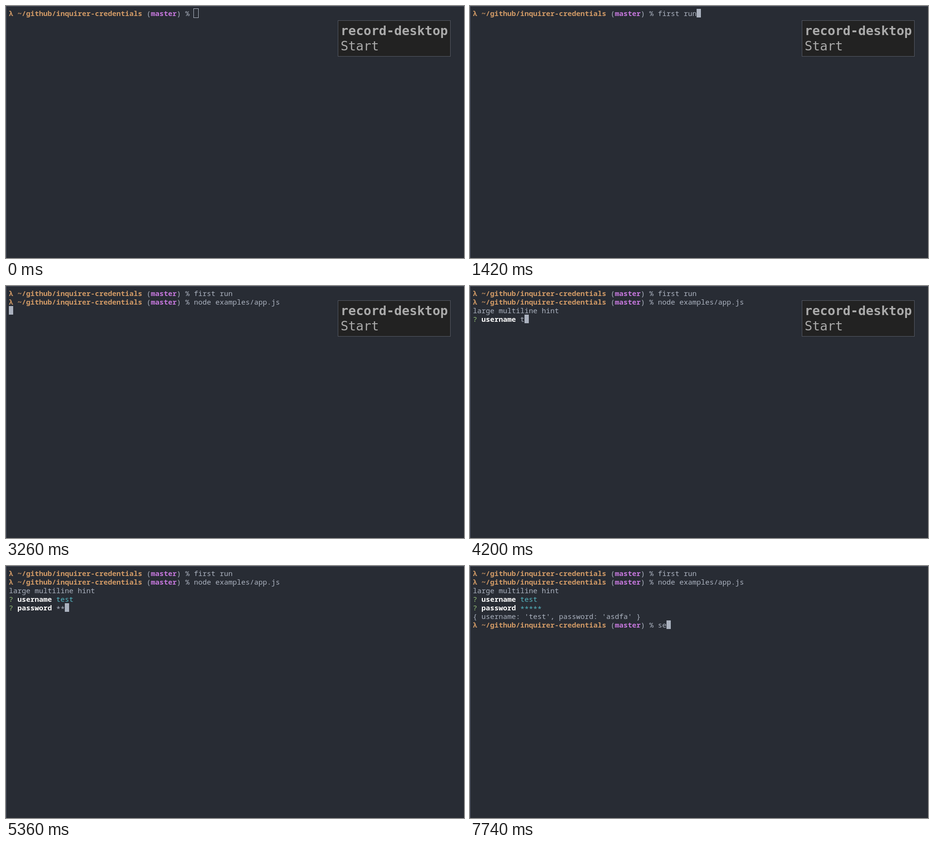
Write an HTML page with a canvas that moves like this. It is 958 by 528 pixels and loops after 8 s.

```html
<!DOCTYPE html>
<html lang="en">
<head>
<meta charset="utf-8">
<title>Terminal session</title>
<style>
  html, body { margin: 0; width: 100%; height: 100%; overflow: hidden; background: #282c34; }
  canvas { display: block; }
</style>
</head>
<body>
<canvas id="stage" width="958" height="528"></canvas>
<script>
const ctx = document.getElementById('stage').getContext('2d');
const LOOP = 8000, CELL = 9, ROW = 18, PAD = 6, INPUT = 43, ANSWER = 11;
const GREY = '#abb2bf', ORANGE = '#d19a66', PURPLE = '#c678dd',
      CYAN = '#56b6c2', GREEN = '#98c379', EDGE = '#4b5263';

// Spans of time in which the blinking cursor is off
const HIDDEN = [[3080, 3260], [3820, 4200], [5260, 5310], [6510, 7110]];

function put(col, row, text, color = GREY, bold = false) {
  ctx.font = `${bold ? 'bold ' : ''}15px "Noto Sans Mono", monospace`;
  ctx.fillStyle = color;
  ctx.fillText(text, PAD + col * CELL, PAD + row * ROW + 15);
}

// The part of a text whose keys have been pressed by time t
function typed(t, text, times) {
  return text.slice(0, times.filter(at => at <= t).length);
}

// Each of these returns the column after its text
function prompt(row, input) {
  put(0, row, 'λ ~/github/inquirer-credentials', ORANGE, true);
  put(32, row, '(');
  put(33, row, 'master', PURPLE, true);
  put(39, row, ') %');
  put(INPUT, row, input);
  return INPUT + input.length;
}

function question(row, label, answer, done) {
  put(0, row, '?', GREEN);
  put(2, row, label, '#fff', true);
  const drop = answer[0] === '*' ? 0.1 : 0;
  put(ANSWER, row + drop, answer, done ? CYAN : GREY);
  return ANSWER + answer.length;
}

function cursor(t, col, row) {
  const x = PAD + col * CELL, y = PAD + row * ROW;
  if (t < 80) {
    ctx.strokeStyle = GREY;
    ctx.strokeRect(x - 0.5, y - 0.5, 10, 19);
  } else if (!HIDDEN.some(([from, to]) => t >= from && t < to)) {
    ctx.fillStyle = GREY;
    ctx.fillRect(x, y, CELL, ROW);
  }
}

function notice() {
  ctx.fillStyle = '#222';
  ctx.fillRect(694, 30, 236, 76);
  ctx.strokeStyle = '#545862';
  ctx.strokeRect(694.5, 30.5, 235, 75);
  ctx.fillStyle = '#aaa';
  ctx.font = 'bold 26.6px "DejaVu Sans Mono", monospace';
  ctx.fillText('record-desktop', 700, 61);
  ctx.font = '26.6px "DejaVu Sans Mono", monospace';
  ctx.fillText('Start', 700, 93);
}

function draw(t) {
  ctx.fillStyle = '#282c34';
  ctx.fillRect(0, 0, 958, 528);
  ctx.fillStyle = EDGE;
  ctx.fillRect(0, 0, 958, 1);
  ctx.fillRect(0, 0, 1, 528);

  let row = 0;
  let col = prompt(0, typed(t, 'first run', [440, 630, 710, 790, 950, 1070, 1185, 1300, 1420]));
  if (t >= 1910) { row = 1; col = 0; }
  if (t >= 1970) col = prompt(1, t < 2310 ? '' : t < 2510 ? 'clear' : 'node examples/app.js');
  if (t >= 3260) { row = 2; col = 0; }
  if (t >= 3590) {
    put(0, 2, 'large multiline hint');
    row = 3;
    col = question(3, 'username', typed(t, 'test', [4200, 4290, 4370, 4460]), t >= 4700);
  }
  if (t >= 4700) {
    row = 4;
    col = question(4, 'password', typed(t, '*****', [5310, 5360, 5430, 5470, 5670]), t >= 5940);
  }
  if (t >= 5940) {
    put(0, 5, "{ username: 'test', password: 'asdfa' }");
    row = 6;
    col = 0;
  }
  if (t >= 6030) col = prompt(6, typed(t, 'se', [7640, 7740]));
  cursor(t, col, row);
  if (t < 4850) notice();
}

const start = performance.now();
function tick() {
  draw((performance.now() - start) % LOOP);
  requestAnimationFrame(tick);
}
tick();
</script>
</body>
</html>
```
